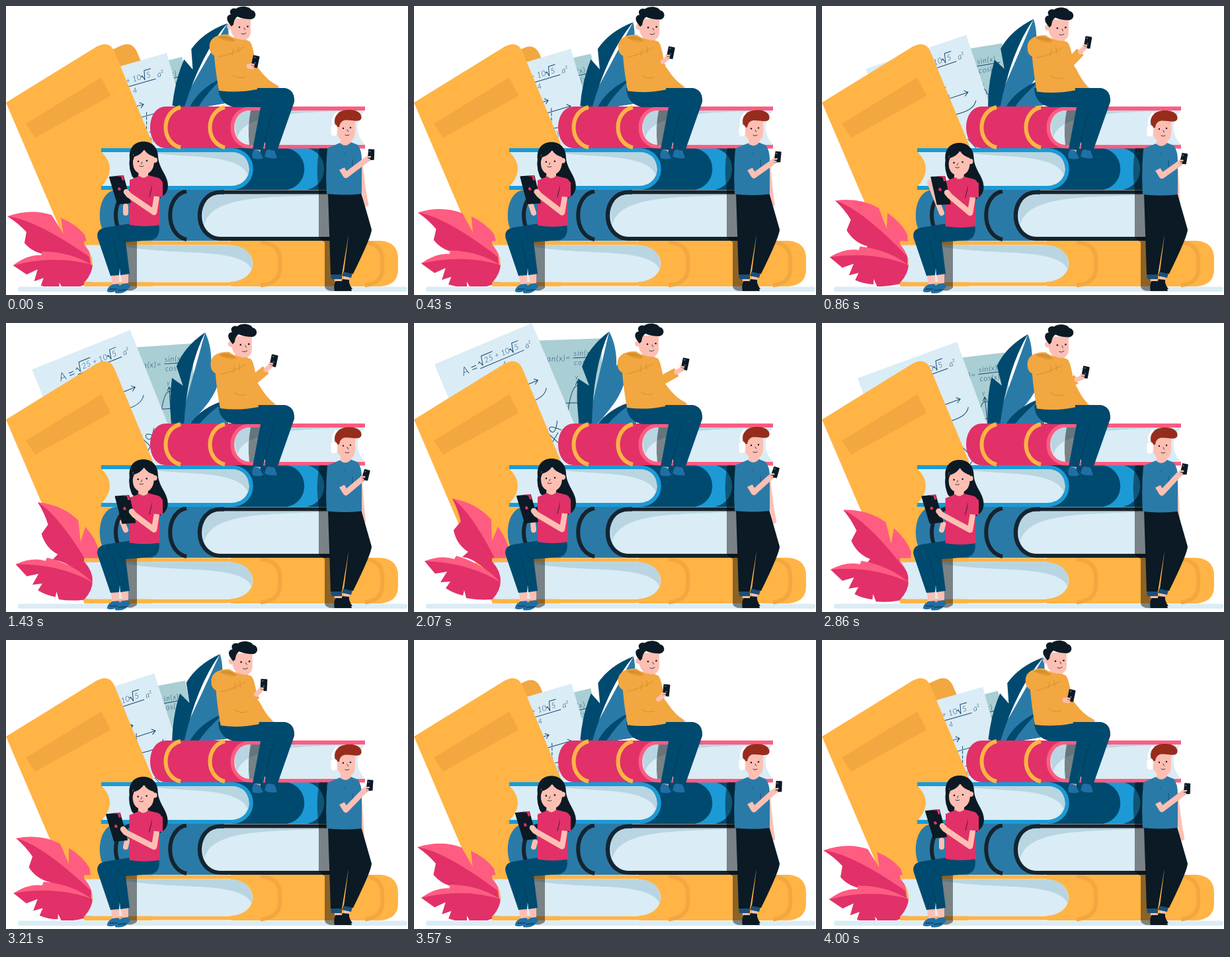
These frames come from a looping animation (608x437 px, 4070 ms). An HTML page:

```html
<!DOCTYPE html>
<html lang="en">
<head>
<meta charset="utf-8">
<title>Students on books</title>
<style>
html,body{margin:0;width:100%;height:100%;overflow:hidden;background:#fff}
svg{display:block;width:608px;height:437px}
.navy{fill:#004a6f}.teal{fill:#2a7aa8}.red{fill:#e13168}.pink{fill:#ff5c82}
.gold{fill:#ffb445}.amber{fill:#f2a740}.page{fill:#daecf5}.shade{fill:#b9d5e2}
.ink{fill:#0b1a24}.skin{fill:#fdbfb3}.dim{fill:#000;opacity:.45}
.ln{fill:none;stroke-width:6}
.arm{fill:none;stroke:#fdbfb3;stroke-linecap:round;stroke-linejoin:round}
.fine{fill:none;stroke:#0b1a24;stroke-width:.8;stroke-linecap:round}
.fold{fill:none;stroke:#d98f2b;stroke-width:1;stroke-linecap:round}
.pen{fill:none;stroke:#17466e;stroke-width:1;stroke-linecap:round;stroke-linejoin:round}
text{font-family:Lato,"Open Sans",sans-serif;font-style:italic;font-weight:300;fill:#17466e}
</style>
</head>
<body>
<svg viewBox="0 0 608 437">
<defs><clipPath id="floor"><path d="M0 0H608V424H0Z"/></clipPath></defs>
<rect class="page" x="18" y="424.500" width="589" height="7.500" rx="3.700"/>

<path id="back" class="amber" d="M120 84L174 60Q189 53 197 67L224 130L150 160Z"/>

<g id="sheet2">
  <path fill="#a9ced4" d="M-110 0H0V180H-110Z"/>
  <text x="-88" y="32" font-size="12" letter-spacing="1">tan(x)=</text>
  <text x="-42" y="25" font-size="11" letter-spacing="1">sin(x)</text>
  <text x="-42" y="39" font-size="11" letter-spacing="1">cos(x)</text>
  <path class="pen" d="M-43 28H-8M-38 64V135M-41 69L-38 63L-35 69M-60 96H-18M-54 108Q-47 70-38 70Q-29 70-22 108"/>
  <text x="-41" y="60" font-size="9">y</text>
</g>

<g id="sheet1">
  <path class="page" d="M-160 0H0V230H-160Z"/>
  <text x="-126" y="33" font-size="17">A</text>
  <path class="pen" d="M-110 26H-103M-110 30H-103M-98 25L-96 23L-93 30L-90 16H-72M-47 24L-45 23L-43 30L-40 16H-30M-98 33H-27M-100 65H-55M-60 61L-55 65L-60 69M-92 83H-25M-30 79L-25 83L-31 87M-18 99Q-26 113-58 108M-22 151Q-34 172-38 160Q-38 149-22 166M-48 150L-30 190M-28 168L-52 186"/>
  <path class="pen" stroke-dasharray="4 3" d="M-54 78L-62 106"/>
  <text x="-88" y="28" font-size="11.500" letter-spacing=".3">25 + 10·</text>
  <text x="-39" y="28" font-size="11.500">5</text>
  <text x="-65" y="45" font-size="11">4</text>
  <text x="-23" y="32" font-size="12">a²</text>
  <text x="-66" y="122" font-size="12">(a)</text>
</g>

<path class="gold" d="M0 146L137 61.500Q156 51 164 69L222 209V424H119Z"/>
<path class="amber" d="M30 178L144 108L158 136L44 199Z"/>

<g id="blue">
  <path class="teal" d="M295 13Q307 35 306 65L319 46Q328 82 305 118Q291 138 274 156H262Z"/>
  <path class="navy" d="M295 13Q264 36 254 66L265 95L248 84Q244 118 251 156H269Q270 68 295 13Z"/>
</g>
<g id="sprig">
  <path class="navy" d="M276 156Q294 128 336 117V156Z"/>
  <path class="teal" d="M290 156Q307 136 336 117V156Z"/>
</g>

<g clip-path="url(#floor)">
  <g id="leafA">
    <path class="pink" d="M58 265Q95 272 117 297L118 330L127 308Q142 328 145 348L139 372L128 398Q105 330 58 265Z"/>
    <path class="red" d="M58 265Q67 282 71 300L60 313Q64 334 82 346L73 354Q100 356 128 398L134 380Q92 290 58 265Z"/>
  </g>
  <g id="leafB">
    <path class="pink" d="M16 360Q42 350 61 357L64 352Q108 365 134 396Q80 372 16 360Z"/>
    <path class="red" d="M16 360L32 379L50 376L40 392L55 391L48 401Q60 409 74 412L76 404L79 416Q106 421 130 416L134 394Q84 362 16 360Z"/>
  </g>
</g>

<!-- books, bottom to top -->
<path class="gold" d="M340 355H566Q593 357 593 382V398Q593 422 566 424H340Z"/>
<path class="ln" stroke="#f2a740" stroke-width="7" d="M385 357Q414 360 414 382V398Q414 419 385 422.500M543 357Q569 360 569 382V398Q569 419 543 422.500"/>
<path class="ln" stroke="#ffb445" d="M118 358.500H335C390 358.500 390 420.500 335 420.500H118"/>
<path class="page" d="M119 361.500H335C386 361.500 386 417.500 335 417.500H119Q143 390 119 361.500Z"/>
<path class="shade" d="M168 361.500H335C368 361.500 375 380 372 399C356 362 250 380 168 361.500Z"/>

<path class="teal" d="M168 278H330V355H168C133 355 133 278 168 278Z"/>
<path class="ln" stroke="#16242e" d="M190 280C158 286 158 347 190 353M273 280C240 286 240 347 273 353"/>
<path class="ln" stroke="#16242e" d="M492 281.500H325C282 281.500 282 352 325 352H492"/>
<path class="page" d="M492 285H325C287 285 287 349 325 349H492Z"/>
<path class="shade" d="M300 330C293 300 305 285 325 285H492C400 290 312 285 300 330Z"/>

<path class="navy" d="M335 215H487V278H335Z"/>
<path fill="#1b9ad6" d="M425 215C460 222 460 271 425 278H455C490 271 490 222 455 215Z"/>
<path class="ln" stroke="#1b9ad6" d="M144 218H340C381 218 381 275 340 275H144"/>
<path class="page" d="M145 221H340C377 221 377 272 340 272H145Q169 246 145 221Z"/>
<path class="shade" d="M215 221H340C366 221 370 242 366 256C352 222 275 231 215 221Z"/>

<path class="red" d="M242 152H375V215H242C210 215 210 152 242 152Z"/>
<path class="ln" stroke="#ffb445" d="M264 153C234 160 234 207 264 214M331 153C301 160 301 207 331 214"/>
<path class="ln" stroke="#ff5c82" d="M543 155H371C333 155 333 212.500 371 212.500H543"/>
<path class="page" d="M543 158H370C337 158 337 210 370 210H543Q520 184 543 158Z"/>
<path class="shade" d="M350 199C340 172 352 158 370 158H528C450 161 360 160 350 199Z"/>
<path class="dim" d="M370 158H386L380 210H368Q365 184 370 158Z"/>
<path class="dim" d="M487 215H474Q468 245 473 278V350L482 357V424Q483 432 498 431V215Z"/>
<path class="dim" d="M176 355H198V426Q190 433 180 429Z"/>

<!-- seated man -->
<path class="skin" d="M376 205H388L384 222H375ZM396 205H406L406 222H397Z"/>
<path fill="#1f6fa5" d="M375 217Q371 224 373 230Q381 233 389 230L383 219ZM394 218L391 227Q398 232 410 230L406 218Z"/>
<path id="lapHand" class="skin" d="M400 114L413 121Q415 126 407 128L395 124Z"/>
<path id="lapArm" class="amber"/>
<path class="navy" d="M321 124H422Q437 127 436 145L410 219L392 217L392 205L388 218L373 217L385 153H345Q322 148 321 124Z"/>
<path class="fine" stroke-width=".6" opacity=".4" d="M391 206L404 158"/>
<g id="manTop">
  <path class="amber" d="M316 60Q345 50 371 57Q379 80 380 126Q350 132 322 128Q317 100 315 76Z"/>
  <path class="skin" d="M345 40H364V52Q355 60 345 50Z"/>
  <path class="amber" d="M308 64C306 48 320 42 336 43C348 53 366 49 370 55C372 66 345 76 320 77C312 75 308 70 308 64Z"/>
  <path class="fold" d="M323 48Q338 56 346 52M322 77Q345 72 360 62M344 64L342 74M351 61L352 70M343 104Q352 111 362 107"/>
  <path fill="#d98f2b" d="M320 47Q334 41 346 52Q334 52 320 47Z"/>
  <path class="skin" d="M340 19H370V38Q370 52 356 51Q342 49 340 36Z"/>
  <circle class="skin" cx="338.500" cy="31" r="4.500"/>
  <path class="ink" d="M338 27C332 20 334 13 340 13C336 6 343 2 348 4C356-2 369 1 371 6C380 8 379 19 371 20Q358 20 350 16Q345 19 344 28L341 31Z"/>
  <circle class="ink" cx="353" cy="32" r="1.300"/><circle class="ink" cx="365.500" cy="31" r="1.300"/>
  <path class="fine" d="M356 42Q360 44 363 41M360 33L361.500 36"/>
</g>
<path id="manSleeve" class="ln" stroke="#f2a740" style="stroke-width:14" stroke-linejoin="round"/>
<path id="manHand" class="arm" stroke-width="7"/>
<g id="manPhone">
  <path class="ink" d="M-4-9H4Q5-9 5-8V8Q5 9 4 9H-4Q-5 9-5 8V-8Q-5-9-4-9Z"/>
  <path fill="#536b9b" d="M-3-7H-1V-5H-3ZM-1 1H1V3H-1Z"/>
  <path class="arm" stroke-width="2.500" d="M-6 5L-1 5M-6 8L-1 8"/>
</g>

<!-- seated woman -->
<path class="skin" d="M158 403H171V422H161ZM173 400H185V420H176Z"/>
<path fill="#1f6fa5" d="M161 421Q152 426 153 432Q164 436 174 425L170 420ZM176 420Q164 428 165 434Q180 437 188 424L185 419Z"/>
<path class="fine" d="M157 428L168 428M170 430L182 429"/>
<path class="navy" d="M188 329H231Q235 350 220 354L181 357L187 405L173 407L172 396L171 407L158 408L139 352Q135 338 150 335Z"/>
<path class="fine" opacity=".4" d="M181 357Q172 354 170 347M172 396L163 358"/>
<g id="girlTop">
  <path class="ink" d="M187 232C185 213 196 205 208 205C222 205 230 215 230 228C231 246 245 256 245 272C245 284 235 292 225 291L191 258Q185 245 187 232Z"/>
  <path class="skin" d="M201 247H215V260Q207 266 200 259Z"/>
  <path class="red" d="M187 263L202 257Q208 263 215 256L231 260Q238 264 237 273L232 291L233 331Q210 335 187 331Z"/>
  <path class="skin" d="M192 225Q204 216 210 218L224 228Q226 253 208 255Q192 253 192 236Z"/>
  <circle class="skin" cx="225" cy="233" r="4"/>
  <path class="ink" d="M191 237Q190 221 204 212Q220 212 226 228Q214 226 209 217Q204 225 194 228Z"/>
  <circle class="ink" cx="200" cy="235" r="1.300"/><circle class="ink" cx="213" cy="234" r="1.300"/>
  <path class="fine" d="M202 242Q205 244 208 242M206 236L204.500 239M222 268L217 288"/>
</g>
<path id="girlFar" class="arm" stroke-width="8"/>
<g id="tablet">
  <path class="ink" stroke="#0b1a24" stroke-width="2" stroke-linejoin="round" d="M-16-19L4-21L15 19L-4 21Z"/>
  <path class="red" d="M-8-21L4-22L6-15L3-14L1-20ZM-1-4A2.500 2.500 0 1 0 1-1Z"/>
</g>
<path id="girlNear" class="arm" stroke-width="8.500"/>
<path id="girlSleeve" class="red" d="M221 266L237 266L237 289L220 287Z"/>

<!-- standing man -->
<path id="hang" class="arm" stroke-width="6.500"/>
<path class="skin" d="M495 403H506V420H498ZM511 400H521L518 420H511Z"/>
<path class="ink" d="M498 416Q495 425 497 431H523Q523 427 512 422L507 416Z"/>
<path class="ink" d="M509 413L506 420L517 429L524 428Q518 420 519 414Z"/>
<path fill="#1d4f78" d="M491 404H508V413H492ZM511 400L524 404L522 411L508 408Z"/>
<path class="ink" d="M487 282H537L553 338Q553 348 525 405L511 402L518 346L508 406H491Z"/>
<g id="guyTop">
  <path class="skin" d="M506 197H522V210Q514 216 506 210Z"/>
  <path class="teal" d="M486 215L505 207Q514 215 522 206L532 210Q538 218 538 232V284Q510 287 485 284Q483 248 486 215Z"/>
  <path class="skin" d="M500 172H528V190Q528 205 515 205Q501 203 500 188Z"/>
  <path class="skin" d="M495 181H502V193H497Z"/>
  <path fill="#962d1c" d="M499 183C493 168 502 157 518 157C532 156 540 164 537 171C533 177 520 171 511 173Q505 175 504 183Z"/>
  <path fill="none" stroke="#fff" stroke-width="3.500" d="M495 184Q491 170 501 161"/>
  <path fill="none" stroke="#dbe1e8" stroke-width=".8" d="M493 182Q489 169 499 160"/>
  <rect x="491" y="179" width="10" height="18" rx="5" fill="#fff" stroke="#e4e8ee" stroke-width=".8"/>
  <circle class="ink" cx="510" cy="185" r="1.200"/><circle class="ink" cx="521" cy="184" r="1.200"/>
  <path class="fine" d="M513 195Q516 197 519 195M516 187L517.500 190"/>
  <path class="fine" style="stroke:#17466e" d="M513 222L502 240M524 232V242"/>
</g>
<path id="guyArm" class="arm" stroke-width="8.500"/>
<path id="guySleeve" class="teal" d="M498 238L508 218L520 235L512 244L502 249Z"/>
<g id="guyPhone">
  <path class="ink" d="M-4-8.500H4Q5-8.500 5-7.500V7.500L-4 8.500Q-5 8-5 7Z"/>
  <path fill="#536b9b" d="M-3-6H-1V-4H-3Z"/>
  <path class="arm" stroke-width="2.500" d="M-6 4L-1 3M-6 7L-2 7"/>
</g>
</svg>
<script>
const LOOP = 4070, CYCLE = 3960;
const TIMES = [0, 860, 1430, 2070, 2570, 3210, 4000];
const el = {};
document.querySelectorAll('[id]').forEach(e => el[e.id] = e);
const put = (id, v) => el[id].setAttribute('transform', v);
const draw = (id, v) => el[id].setAttribute('d', v);
const mix = (a, b, p) => a + (b - a) * p;

// symmetric cubic-bezier(.45, 0, .55, 1)
function ease(x) {
  let lo = 0, hi = 1;
  for (let i = 0; i < 22; i++) {
    const s = (lo + hi) / 2, r = 1 - s;
    if (1.35 * s * r * r + 1.65 * s * s * r + s * s * s < x) lo = s; else hi = s;
  }
  return lo * lo * (3 - 2 * lo);
}
const swing = (t, period) => {
  const u = t % period / period;
  return ease(1 - Math.abs(2 * u - 1));
};

// smooth closed track through one value per key time
function track(...v) {
  const n = v.length - 1;
  const slope = i => {
    const a = (i - 1 + n) % n, b = i % n;
    return (v[b + 1] - v[a]) / (TIMES[b + 1] - TIMES[b] + TIMES[a + 1] - TIMES[a]);
  };
  return t => {
    if (t >= TIMES[n]) return v[n];
    let i = 0;
    while (t >= TIMES[i + 1]) i++;
    const h = TIMES[i + 1] - TIMES[i], s = (t - TIMES[i]) / h, r = 1 - s;
    return v[i] * (1 + 2 * s) * r * r + slope(i) * h * s * r * r
      + v[i + 1] * s * s * (3 - 2 * s) - slope(i + 1) * h * s * s * r;
  };
}
const man = [track(377, 402, 405, 410, 405, 390, 377), track(84, 55, 57, 62, 79, 68, 84), track(12, 10, 12, 12, 18, 3, 12)];
const girl = [track(173, 180, 181, 172, 168, 168, 173), track(278, 279, 282, 281, 280, 283, 278), track(0, 4, 2, 0, 0, 0, 0)];
const far = [track(181, 163, 176, 180, 183, 183, 181), track(303, 267, 301, 303, 304, 304, 303)];
const guy = [track(552, 547, 544, 546, 546, 550, 552), track(225, 231, 230, 226, 223, 220, 225), track(2, 10, 14, 16, 14, 4, 2)];
const at = (tracks, t) => tracks.map(f => f(t));
const pose = ([x, y, a]) => `translate(${x} ${y}) rotate(${a})`;

function render(t) {
  const p = t < CYCLE ? swing(t, CYCLE) : 0;
  const q = t < CYCLE ? swing(t, CYCLE / 2) : 0;

  put('back', `translate(${-90 * Math.min(p, .45)} ${40 * Math.min(p, .45)})`);
  put('sheet1', pose([mix(243, 178, p), mix(71, 0, p), mix(-16, -22.9, p)]));
  put('sheet2', pose([mix(266, 283, p), mix(77, 23, p), mix(-14, -2, p)]));
  put('blue', `rotate(${16.7 * (1 - p)} 270 155)`);
  put('sprig', `rotate(${mix(-10, 0, p)} 280 155)`);
  put('leafA', `rotate(${-30.3 * (1 - p)} 128 395)`);
  put('leafB', `rotate(${-16 * (1 - p)} 128 395)`);

  put('manTop', `translate(${3 * q} ${1.5 * q})`);
  put('lapHand', `translate(${-9 * q} ${2 * q})`);
  draw('lapArm', `M${374 + 3 * q} 84L${383 + 2 * q} 96Q${396 - 3 * q} 113 ${411 - 10 * q} 121V127H376Z`);
  const m = at(man, t), hx = m[0] - 5, hy = m[1] + 8, ex = 367 + 3 * q, ey = 91;
  const len = Math.hypot(hx - ex, hy - ey) || 1, k = Math.max(0, len - 9) / len;
  const wx = mix(ex, hx, k), wy = mix(ey, hy, k);
  draw('manSleeve', `M${352 + 3 * q} 92L${ex} ${ey}L${wx} ${wy}`);
  draw('manHand', `M${wx} ${wy}L${hx} ${hy}`);
  put('manPhone', pose(m));

  const g = at(girl, t), f = at(far, t);
  put('girlTop', `translate(${-.4 * q} ${2 * q})`);
  put('girlSleeve', `translate(0 ${1.5 * q})`);
  put('tablet', pose(g));
  draw('girlFar', `M181 313L${f[0]} ${f[1]}`);
  draw('girlNear', `M228 ${288 + q}L224 ${312 + q}L${g[0] + 13} ${g[1] + 8}L${g[0] + 9} ${g[1] + 3}`);

  const s = at(guy, t);
  put('guyTop', `translate(0 ${q})`);
  put('guySleeve', `translate(0 ${q})`);
  draw('hang', `M${536 - q} 240L${mix(541, 537, q)} 278L${mix(545, 538, q)} 300`);
  draw('guyArm', `M506 ${243 + q}L514 ${256 + q}L${s[0] - 9} ${s[1] + 9}L${s[0] - 5} ${s[1] + 6}`);
  put('guyPhone', pose(s));
}

const start = performance.now();
function tick() {
  render((performance.now() - start) % LOOP);
  requestAnimationFrame(tick);
}
tick();
</script>
</body>
</html>
```
